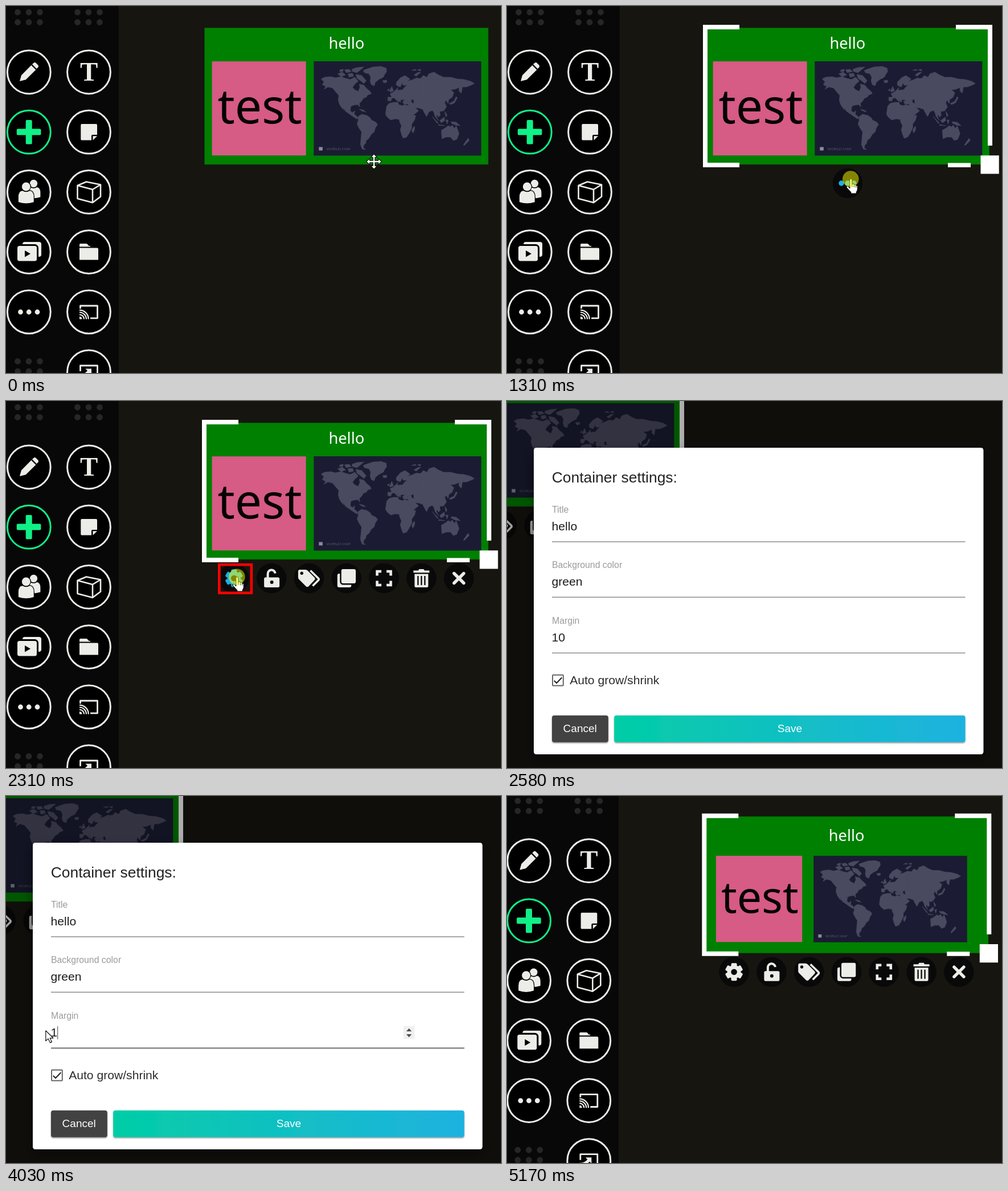
Animation, 869 px wide and 644 px high, one loop 6330 ms. Source, as an HTML page:

```html
<!DOCTYPE html>
<html lang="en">
<head>
<meta charset="utf-8">
<title>Container settings</title>
<style>
  html, body { margin: 0; width: 100%; height: 100%; overflow: hidden; background: #161510; }
  svg { display: block; width: 100vw; height: 100vh; }
  .ui { font-family: "Liberation Sans", Arial, sans-serif; }
  .note { font-family: "Noto Sans", sans-serif; }
  .label { font-size: 15.84px; fill: #9b9b9b; }
  .value { font-size: 21.12px; fill: #1c1c1c; }
  .btn { font-size: 19px; fill: #fff; text-anchor: middle; }
</style>
</head>
<body>
<svg id="stage" viewBox="0 0 869 644" xmlns="http://www.w3.org/2000/svg"></svg>
<script>
const LOOP = 6330;
const LIGHT = '#ecece8', GREEN = '#10f086', BLUE = '#1eaee2', BTN = '#090909';
const stage = document.getElementById('stage');

const rect = (x, y, w, h, fill, more = '') =>
  `<rect x="${x}" y="${y}" width="${w}" height="${h}" fill="${fill}" ${more}/>`;
const dot = (x, y, r, fill, more = '') =>
  `<circle cx="${x}" cy="${y}" r="${r}" fill="${fill}" ${more}/>`;
const path = (d, fill, more = '') => `<path d="${d}" fill="${fill}" ${more}/>`;
const line = (d, color, w, more = '') =>
  path(d, 'none', `stroke="${color}" stroke-width="${w}" ${more}`);
const text = (x, y, s, more) => `<text x="${x}" y="${y}" ${more}>${s}</text>`;
const group = (id, body, more = '') => `<g id="${id}" ${more}>${body}</g>`;

// ---- left toolbar ----
const dots = (x, ys) =>
  ys.map(y => [0, 19.5, 39].map(d => dot(x + d, y, 5.4, '#262626')).join('')).join('');
const ring = (x, y, color = LIGHT) =>
  dot(x, y, 37.9, '#000', `stroke="${color}" stroke-width="3"`);

function sidebar() {
  let s = rect(-20, -20, 217.7, 700, '#080808');
  s += dots(20.5, [11, 28.5, 623.5, 641]) + dots(125.5, [11, 28.5]);
  for (let i = 0; i < 6; i++) {
    const y = 116 + i * 105.2;
    if (i < 5) s += ring(40.3, y, i === 1 ? GREEN : LIGHT);
    s += ring(145.5, y);
  }
  // pencil and text
  s += path('M27 121.5L44.3 104L52.3 112L34.8 129.3L24 132Z', LIGHT);
  s += path('M46 102.3L49 99.4Q50.5 98.4 52 99.6L56.5 104Q57.6 105.6 56.5 107.2L53.8 110.2Z', LIGHT);
  s += text(145.6, 130.5, 'T', `fill="${LIGHT}" font-size="47" font-weight="700" text-anchor="middle" font-family="Liberation Serif, serif"`);
  // plus and sticky note
  s += rect(18.8, 215.5, 42.6, 11, GREEN, 'rx="2"') + rect(34.7, 200, 11, 42.5, GREEN, 'rx="2"');
  s += path('M133 207H158Q160 207 160 209V226H152Q150 226 150 228V235.5H133Q131.3 235.5 131.3 233.5V209Q131.3 207 133 207Z', LIGHT);
  s += path('M152.5 235.5V228.3H160Z', LIGHT);
  // people
  const body = 'M-14 28V19Q-14 8 -6.5 7.5Q0 12 6.5 7.5Q14 8 14 19V28Q0 33 -14 28Z';
  const person = (x, y, k) =>
    `<g transform="translate(${x} ${y}) scale(${k})" stroke="#000" stroke-width="2.5" paint-order="stroke">${path(body, LIGHT)}${dot(0, 0, 7.8, LIGHT)}</g>`;
  s += person(48.5, 311.5, .85) + person(35.3, 317, .96);
  // cube
  s += line('M125.5 315L141 308.5L166 313.5L152 322ZM125.5 315V338L152 345L166 334.5V313.5M152 322V345', LIGHT, 2.6, 'stroke-linejoin="round"');
  // video cards and folder
  s += rect(29, 414, 33, 26, LIGHT, 'rx="4"');
  s += rect(20, 421, 34, 26.5, LIGHT, 'rx="3.5" stroke="#000" stroke-width="6" paint-order="stroke"');
  s += path('M33 429V440.5L43 434.8Z', '#000');
  s += path('M129 422.5V418.5Q129 417 130.5 417H141Q142 417 143 418L145.5 421H148V422.5ZM129 424.5H160Q162 424.5 162 426.5V445.5H129Z', LIGHT);
  // more and cast
  for (const x of [25.5, 40.2, 55]) s += dot(x, 537, 4.4, LIGHT);
  s += line('M130.5 531V526H160.5V547.8H148', LIGHT, 2.8, 'stroke-linejoin="round"');
  s += path('M129 549.5V545A4.5 4.5 0 0 1 133.5 549.5Z', LIGHT);
  s += line('M129 541.5A8 8 0 0 1 137 549.5M129 537.5A12 12 0 0 1 141 549.5M129 533.7A15.8 15.8 0 0 1 144.8 549.5', LIGHT, 2.2);
  // share screen
  s += line('M130.5 641V631H160.5V660', LIGHT, 2.8, 'stroke-linejoin="round"');
  s += path('M139.5 636.5H150V647L146.8 643.8Q140 651 129 650V646Q138 646.5 143 640Z', LIGHT);
  return s;
}

// ---- world map, local size 294 x 165 ----
const LAND = [
  'M13 31L19 28L30 27L38 29L48 27L56 30L64 32L72 28L78 35L72 40L68 46L72 50L78 53L81 46L80 40L88 42L92 47L99 53L101 57L95 59L92 63L87 65L84 70L80 74L81 80L77 76L70 77L65 79L64 87L68 90L72 87L71 93L75 96L78 100L75 101L69 97L62 92L56 88L51 81L50 78L52 85L48 80L45 75L43 68L44 60L38 53L33 47L25 45L18 49L21 44L15 41L18 36Z',
  'M42 22L50 19L56 24L48 27ZM54 15L62 14L66 18L57 20ZM60 22L68 21L70 26L62 28ZM67 14L76 11L88 10L82 15L76 20L68 18ZM74 23L84 25L92 34L88 39L82 34L76 30ZM46 15L52 14L51 18L45 18Z',
  'M92 14L104 10L118 9L127 12L128 18L124 24L122 28L114 32L108 37L106 43L101 41L99 35L100 28L97 22L89 20L87 16ZM121 34L128 33L128 37L123 38ZM80 84L88 86L91 89L84 87Z',
  'M78 97L84 93L93 95L99 99L101 103L109 107L112 111L108 117L106 124L101 128L97 135L92 139L91 144L88 147L87 152L91 155L85 154L82 146L83 134L84 124L80 118L76 110L78 104Z',
  'M132 74L140 72L148 72L149 76L155 78L160 76L166 78L168 83L172 91L175 95L179 95L177 103L172 110L172 117L169 123L167 127L163 133L157 135L154 128L152 120L154 113L151 107L150 102L143 101L135 103L129 98L126 93L127 86L128 79ZM174 117L177 114V120L174 126L172 122Z',
  'M130 69L130 63L137 63L134 57L140 54L145 49L148 46L146 51L156 50L160 45L164 42L157 42L155 38L152 45L149 44L145 42L145 37L152 29L160 25L169 31L165 35L172 33L181 29L181 64L166 70L156 71L160 68L153 67L152 72L145 64L150 71L147 70L141 64L137 65L135 70ZM133 52L137 44L140 52L134 54ZM129 51L132 48V52Z',
  'M179 30L188 30L192 25L199 28L202 22L211 19L219 24L228 28L240 28L252 31L264 32L275 35L282 39L276 42L268 45L261 45L259 56L255 52L255 46L248 49L240 50L246 55L243 63L237 67L236 74L232 68L230 73L233 80L228 87L221 88L222 95L219 98L217 94L215 96L219 104L213 97L211 90L208 86L202 89L198 97L194 90L191 84L184 82L178 81L184 87L174 95L170 90L165 81L166 75L158 75L156 70L166 71L170 66L172 73L176 74L175 66Z',
  'M224 121L231 117L236 113L240 115L243 112L247 118L250 113L253 121L255 127L251 137L245 139L240 133L232 133L225 136ZM271 135L273 139L264 148L263 146ZM238 74L246 70L250 62L252 64L247 73L240 76ZM208 97L219 109L216 108ZM219 111L230 113L219 112.5ZM221 104L229 98L230 104L224 108ZM232 103H236L234 110ZM241 106L250 107L257 113L249 112L242 109ZM230 88L234 94L232 98ZM176 24L182 20L188 19L180 26ZM172 16L178 14L180 16ZM182 15L188 14L187 17Z'
];
const map = rect(0, 0, 294, 165.5, '#1b1c33') +
  path(LAND.join(''), '#494a5f', 'stroke="#494a5f" stroke-width=".7" stroke-linejoin="round"') +
  rect(9, 150.5, 6.5, 6, '#8b8c98') +
  text(22.5, 156, 'WORLD MAP', 'font-family="Lato, sans-serif" font-size="6.6" font-weight="300" letter-spacing=".2" fill="#85869a"');
const card = rect(0, 0, 165, 165, '#d65b85') +
  text(9.8, 109, 'test', 'class="note" font-size="84" fill="#050305"');

// ---- selection frame and its buttons ----
const frame = path('M344 33H408V41H352V275H408V283H344ZM788 33H852V245H844V41H788ZM774 275.5H814V283H774ZM831.5 262.3H863.7V294.6H831.5Z', '#fff');
const C = 'currentColor';
const tooth = a => rect(-5, -15.5, 10, 9, C, `rx="2" transform="rotate(${a})"`);
const ICONS = [
  [0, 60, 120, 180, 240, 300].map(tooth).join('') + dot(0, 0, 8.6, 'none', `stroke="${C}" stroke-width="6.6"`),
  rect(-13, -1.5, 27, 17.5, C, 'rx="2.5"') +
    line('M-6.5 0V-7.5A6.5 6.5 0 0 1 6.5 -8.5', C, 4) + dot(0.5, 7, 3, BTN),
  path('M-19 -12Q-19 -15 -16 -15H-6Q-4 -15 -2.5 -13.5L9.5 -1.5Q12 1 9.5 3.5L-.5 14Q-3 16.5 -5.5 14L-17.5 2Q-19 .5 -19 -1.5Z', C) +
    dot(-12.7, -8.7, 2.7, BTN) + line('M2.5 -13.5L16.5 .3Q18 2 16.5 3.6L6.5 13.6', C, 3.6),
  rect(-16, -8, 24.5, 24, C, 'rx="3"') +
    rect(-9, -16, 25.3, 25, C, `rx="3" stroke="${BTN}" stroke-width="5" paint-order="stroke"`),
  line('M-12 -4.5V-12H-4.5M4.5 -12H12V-4.5M12 4.5V12H4.5M-4.5 12H-12V4.5', C, 4.6),
  path('M-14 -13.5H-5.5L-4 -16H4L5.5 -13.5H14V-9.8H-14ZM-12 -7.5H12V13.5Q12 16 9.5 16H-9.5Q-12 16 -12 13.5Z', C) +
    line('M-6 -4V12M0 -4V12M6 -4V12', BTN, 2.3),
  line('M-8.5 -8.5L8.5 8.5M8.5 -8.5L-8.5 8.5', C, 5.4, 'stroke-linecap="round"')
];
const menu = ICONS.map((icon, i) =>
  `<g class="item" transform="translate(${400.3 + i * 65.8} 311)">${dot(0, 0, 26.3, BTN)}${icon}</g>`).join('');
const more = dot(598, 311, 26.3, BTN) + [587, 598, 609].map(x => dot(x, 311, 4.7, C)).join('');

// ---- dialog ----
const field = (y, label, value) =>
  text(79, y, label, 'class="label"') + text(78.6, y + 31.4, value, 'class="value"') +
  rect(79, y + 50.6, 725.5, 1.4, '#858585');
const dialog =
  rect(47, 82, 789.4, 538, '#fff', 'rx="4.5" filter="url(#shade)"') +
  text(78.8, 143, 'Container settings:', 'font-size="26.4" fill="#222"') +
  field(195.7, 'Title', 'hello') + field(293, 'Background color', 'green') + field(390.9, 'Margin', '') +
  group('hover', rect(79, 441.3, 725.5, 2.4, '#8a8a8a')) +
  group('spin', rect(697.7, 404, 19.6, 22.4, '#f0f0f0') +
    path('M702.8 413L707.5 407.7L712.2 413ZM702.8 418L707.5 423.3L712.2 418Z', '#4d4d4d')) +
  rect(79, 404, 23.3, 23, '#0078d7', 'id="mark"') +
  text(78.6, 422.3, '', 'id="margin" class="value"') +
  rect(0, 404, 1.1, 23, '#555', 'id="caret"') +
  rect(80, 480.8, 18.8, 18.6, '#fff', 'rx="1" stroke="#666" stroke-width="2"') +
  line('M82.8 490.8L87 495L96.3 485.2', '#222', 2) +
  text(110.2, 497.3, 'Auto grow/shrink', 'class="value" style="fill:#2c2c2c"') +
  rect(79, 551.8, 98.8, 47, '#424242', 'rx="4" filter="url(#lift)"') +
  text(128.2, 581, 'Cancel', 'class="btn"') +
  rect(188.2, 551.8, 616.3, 47, 'url(#save)', 'rx="4" filter="url(#lift)"') +
  text(496.5, 581, 'Save', 'class="btn"');

// ---- pointers, drawn around their hot spot ----
const edge = 'stroke="#111" stroke-width="1.2" stroke-linejoin="round"';
const POINTERS = {
  move: path('M0 -13.5L5.5 -7.5H1.8V-1.8H7.5V-5.5L13.5 0L7.5 5.5V1.8H1.8V7.5H5.5L0 13.5L-5.5 7.5H-1.8V1.8H-7.5V5.5L-13.5 0L-7.5 -5.5V-1.8H-1.8V-7.5H-5.5Z', '#fff', edge),
  hand: path('M-1.5 16V2Q-1.5 0 .5 0T2.5 2V9Q6 7.5 6.3 10.2Q9.3 9 9.6 11.5Q12.2 10.8 12 13.5V18Q12 20.5 10 23V25.5H.5V23.5L-7 15.5Q-8.2 12.8 -5 12.5Z', '#fff', edge) +
    line('M2.5 9V14M6.2 10.5V14.5M9.4 12V15', '#111', .9),
  arrow: path('M.5 .5V18.5L4.8 14.6L8.3 21.6L11.2 20.3L7.8 13.5H13.6Z', '#fff', edge),
  beam: line('M-3.5 -9H-.8L0 -8.3L.8 -9H3.5M0 -8.3V8.3M-3.5 9H-.8L0 8.3L.8 9H3.5', '#222', 1.2)
};

stage.innerHTML = `<defs>
  <linearGradient id="save"><stop offset="0" stop-color="#03cda6"/><stop offset="1" stop-color="#1fb2e0"/></linearGradient>
  <filter id="shade" x="-10%" y="-10%" width="120%" height="125%"><feDropShadow dx="0" dy="8" stdDeviation="10" flood-opacity=".45"/></filter>
  <filter id="lift" x="-10%" y="-20%" width="120%" height="150%"><feDropShadow dx="0" dy="1.5" stdDeviation="1.3" flood-opacity=".45"/></filter>
</defs>` +
  rect(0, 0, 869, 644, '#161510') +
  group('board',
    sidebar() +
    rect(348.7, 38.3, 498, 239.7, '#008000', 'stroke="#0a5a08" stroke-width=".7"') +
    text(597.8, 75, 'hello', 'id="title" class="note" font-size="27.2" fill="#fff" text-anchor="middle"') +
    group('card', card) + group('map', map) + group('frame', frame) +
    group('more', more) + group('menu', menu) +
    rect(374.3, 287.2, 56.6, 49.6, 'none', 'id="focus" stroke="#f00" stroke-width="4.6"')) +
  group('modal', rect(0, 0, 869, 644, '#000', 'opacity=".32"') + dialog, 'class="ui"') +
  group('pointer', Object.entries(POINTERS).map(([k, v]) => group(k, v)).join('') +
    dot(0, 0, 14.3, '#ff0', 'id="press" opacity=".5"'));

const $ = id => document.getElementById(id);
const items = [...document.querySelectorAll('.item')];
const show = (id, on) => $(id).setAttribute('display', on ? 'inline' : 'none');
const place = (id, x, y, k = 1) => $(id).setAttribute('transform', `translate(${x} ${y}) scale(${k})`);

// [start, pointer, x, y, pressed]
const MOVES = [
  [0, 'move', 646, 273, 0], [250, 'move', 646, 273, 1], [520, 'move', 646, 273, 0],
  [790, 'hand', 603.3, 303.5, 0], [1040, 'hand', 603.3, 303.5, 1], [1580, 'hand', 603.3, 303.5, 0],
  [1850, 'hand', 509, 307, 0], [2060, 'hand', 405.3, 308.7, 0], [2310, 'hand', 405.3, 308.7, 1],
  [2580, '', 0, 0, 0], [2950, 'beam', 145, 417.5, 0], [3220, 'beam', 145, 417.5, 1],
  [3490, 'arrow', 69.3, 411.3, 1], [3760, 'arrow', 69.3, 411.3, 0],
  [4550, 'hand', 369.2, 585.2, 0], [4940, 'hand', 369.2, 585.2, 1], [5170, '', 0, 0, 0]
];

function draw(t) {
  const between = (a, b) => t >= a && t < b;
  const modal = between(2580, 5170), done = t >= 5170;

  if (modal) place('board', -541, -93);
  else if (done) place('board', -1.7, -2.3);
  else place('board', 0, 0);
  $('title').setAttribute('y', done ? 81.4 : 75);
  if (done) { place('card', 368.6, 107.2, .917); place('map', 539.8, 107.2, .917); }
  else { place('card', 361.6, 97.2); place('map', 540.3, 97); }

  show('frame', t >= 520);
  show('more', between(520, 1580));
  $('more').style.color = t >= 790 ? BLUE : LIGHT;
  show('menu', t >= 1580);
  show('focus', between(2060, 2580));
  const hot = between(1580, 1850) ? 3 : between(1850, 2060) ? 2 : between(2060, 2580) ? 0 : -1;
  items.forEach((el, i) => { el.style.color = i === hot ? BLUE : LIGHT; });

  show('modal', modal);
  const marked = between(3490, 4030);
  const value = t < 4030 ? '10' : t < 4300 ? '1' : '15';
  show('hover', t >= 2950);
  show('spin', t >= 2950);
  show('mark', marked);
  $('margin').textContent = value;
  $('margin').style.fill = marked ? '#fff' : '#1c1c1c';
  show('caret', t >= 3220 && !marked);
  $('caret').setAttribute('x', 78.4 + value.length * 11.75);

  const [, kind, x, y, pressed] = MOVES.filter(m => m[0] <= t).pop();
  for (const k in POINTERS) show(k, k === kind);
  show('press', pressed);
  place('pointer', x, y);
}

const start = performance.now();
function tick() {
  draw((performance.now() - start) % LOOP);
  requestAnimationFrame(tick);
}
tick();
</script>
</body>
</html>
```
